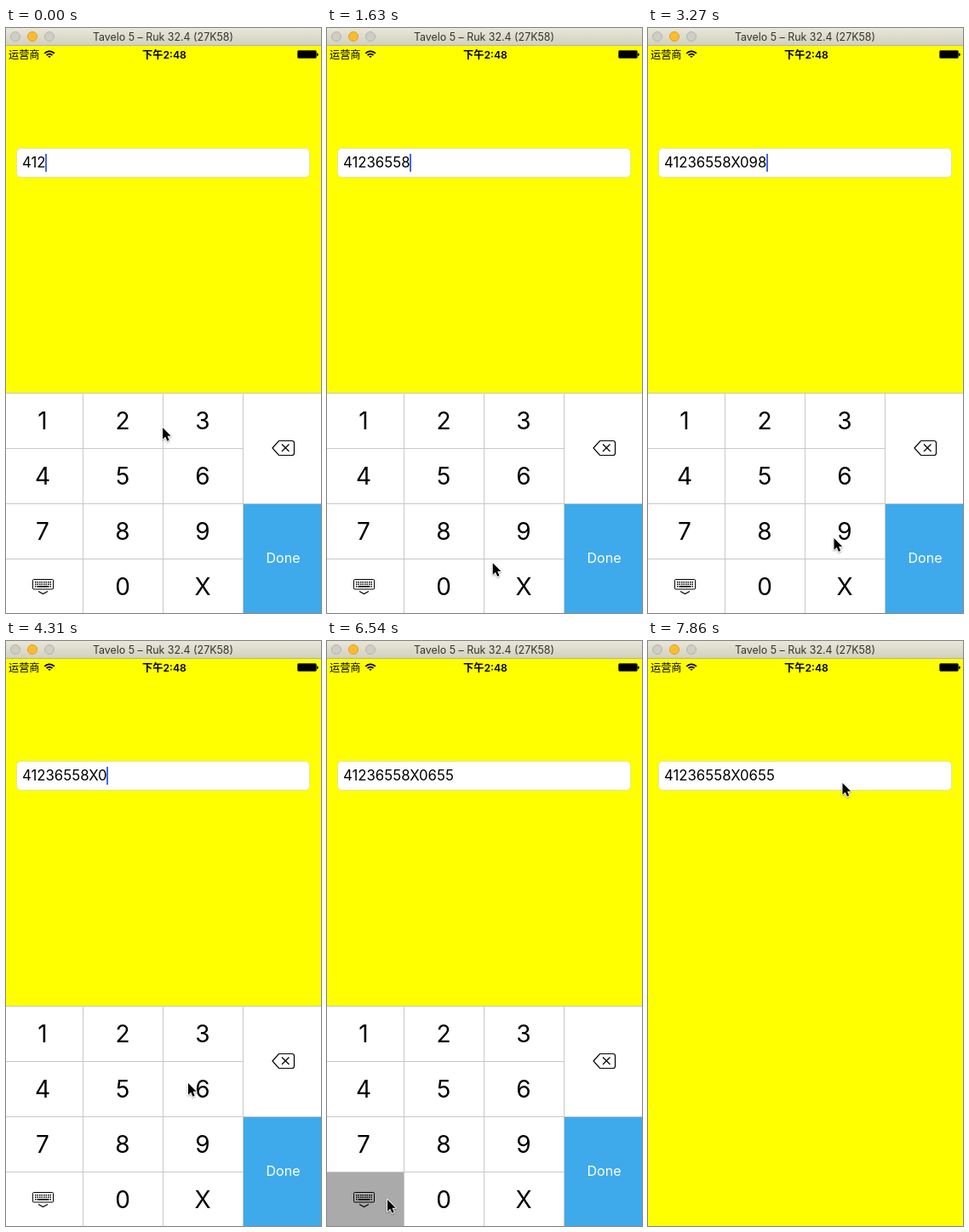
An HTML page with a canvas for the animation above (8000 ms loop, 370 by 688 pixels).

```html
<!DOCTYPE html>
<html lang="zh">
<head>
<meta charset="utf-8">
<title>Number pad</title>
<style>
html, body { margin: 0; width: 100%; height: 100%; overflow: hidden; background: #ff0; }
canvas { display: block; width: 370px; height: 688px; }
</style>
</head>
<body>
<canvas id="stage" width="370" height="688"></canvas>
<script>
const ctx = document.getElementById('stage').getContext('2d');
const W = 370, H = 688, LOOP = 8000, STEP = 148.4;
const LAST = Math.floor(LOOP / STEP);
const PAD_TOP = 430, COL = 94, ROW = 65;
const FONT = 'Inter, "Noto Sans CJK SC", "Noto Sans CJK", sans-serif';
const LINE = '#c8c8c8';

// '<' deletes, 'v' hides the pad
const KEYS = {};
[...'123456789v0X'].forEach((name, i) => addKey(name, i % 3, Math.floor(i / 3), 1));
addKey('<', 3, 0, 2);
addKey('Done', 3, 2, 2);

function addKey(name, col, row, rows) {
  const x = COL * col - 3, y = PAD_TOP + ROW * row;
  const h = ROW * rows - 1;
  KEYS[name] = { x, y, h, cx: x + 46, cy: y + h / 2 };
}

const move = (at, x, y) => ({ at, x, y, hold: 1 });

function tap(at, key, dx = -12, dy = 8, hold = 1) {
  const { cx, cy } = KEYS[key];
  return { at, key, x: cx + dx, y: cy + dy, hold };
}

const EVENTS = [
  move(0, 184, 470),
  tap(3, '3'), tap(6, '6'), tap(7, '5'), tap(8, '5'), tap(10, '8'),
  tap(13, 'X', -13, -18), tap(15, '0'), tap(19, '9'), tap(20, '8'),
  move(23, 218.5, 600),
  tap(26, '<'), tap(27, '<'), tap(30, '6', -17, -7),
  tap(32, '5'), tap(33, '5'), tap(34, '5'),
  tap(38, '<', -12, 1), tap(44, 'v', 28, 0, 3),
  move(52, 228, 151), move(53, 228.5, 167)
];
const HIDE = EVENTS.find(e => e.key === 'v');

const clamp = u => Math.min(1, Math.max(0, u));
const easeOut = u => 1 - (1 - clamp(u)) ** 2;

// The pointer reaches each place one step before it acts there.
function pointerAt(k) {
  const i = EVENTS.findLastIndex(e => e.at <= k);
  const a = EVENTS[i], b = EVENTS[i + 1] || a;
  const leave = a.at + a.hold - 1;
  const u = easeOut((k - leave) / Math.max(1, b.at - 1 - leave));
  return [a.x + (b.x - a.x) * u, a.y + (b.y - a.y) * u];
}

// A key acts when it is released.
function typedAt(k) {
  return EVENTS.filter(e => e.key && e !== HIDE && e.at + e.hold <= k)
    .reduce((s, e) => e.key === '<' ? s.slice(0, -1) : s + e.key, '412');
}

// Quick taps are too short to show a pressed key.
function pressedAt(k) {
  const i = EVENTS.findLastIndex(e => e.at <= k);
  const e = EVENTS[i];
  const slow = i > 0 && e.at - EVENTS[i - 1].at > 2;
  return slow && k < e.at + e.hold ? KEYS[e.key] : null;
}

const slideAt = k => (H - PAD_TOP + 1) * easeOut((k - HIDE.at - HIDE.hold + 0.4) / 2.9);

function rect(x, y, w, h, color) {
  ctx.fillStyle = color;
  ctx.fillRect(x, y, w, h);
}

function text(s, x, y, size, { color = '#000', align = 'left', weight = 400 } = {}) {
  ctx.font = `${weight} ${size}px ${FONT}`;
  ctx.textAlign = align;
  ctx.fillStyle = color;
  ctx.fillText(s, x, y);
}

function stroke(width, color = '#000') {
  ctx.lineWidth = width;
  ctx.strokeStyle = color;
  ctx.stroke();
}

function path(...points) {
  ctx.beginPath();
  points.forEach(p => ctx.lineTo(...p));
}

function roundBox(x, y, w, h, r, fill, edge) {
  ctx.beginPath();
  ctx.roundRect(x, y, w, h, r);
  if (fill) { ctx.fillStyle = fill; ctx.fill(); }
  if (edge) stroke(1, edge);
}

function titleBar() {
  const g = ctx.createLinearGradient(0, 0, 0, 20);
  g.addColorStop(0, '#e9e7d8');
  g.addColorStop(1, '#d2d0bf');
  rect(0, 0, W, 20, g);
  rect(0, 20, W, 1, '#b5b39a');
  for (let i = 0; i < 3; i++) {
    ctx.beginPath();
    ctx.arc(11 + 20 * i, 10, 5.5, 0, 7);
    ctx.fillStyle = i === 1 ? '#fdbc2e' : '#cfcec6';
    ctx.fill();
    stroke(1, i === 1 ? '#dd9f24' : '#b5b4ab');
  }
  text('Tavelo 5 – Ruk 32.4 (27K58)', 184.5, 15, 12.4, { align: 'center', color: '#35342f' });
}

function statusBar() {
  text('运营商', 3, 35.5, 12.2);
  text('下午2:48', 186, 35.5, 12.2, { align: 'center', weight: 600 });
  for (const r of [1.3, 4.4, 7.6]) {
    ctx.beginPath();
    ctx.arc(51, 35, r, -Math.PI * 0.77, -Math.PI * 0.23);
    stroke(1.8);
  }
  roundBox(342.5, 26.5, 22, 9, 1.5, '#000', '#55550a');
  roundBox(365, 29.5, 1.6, 3.6, 0.8, '#000');
}

function field(k) {
  roundBox(12.5, 141.5, 344, 34, 5, '#fff', '#e3e3a0');
  const s = typedAt(k);
  text(s, 19, 164, 16.75);
  if (k < HIDE.at) rect(Math.round(18.5 + ctx.measureText(s).width), 148, 2, 21, '#4468e8');
}

function deleteIcon() {
  path([313, 494], [320.5, 485.5]);
  ctx.arcTo(338.5, 485.5, 338.5, 502.5, 2.5);
  ctx.arcTo(338.5, 502.5, 320.5, 502.5, 2.5);
  ctx.lineTo(320.5, 502.5);
  ctx.closePath();
  stroke(1.2);
  path([324, 489.5], [332.5, 498]);
  stroke(1.2);
  path([332.5, 489.5], [324, 498]);
  stroke(1.2);
}

function hideIcon() {
  roundBox(31.5, 648.5, 24, 11.5, 1, null, '#000');
  for (let i = 0; i < 24; i++)
    rect(34 + (i % 8) * 2.5, 651 + Math.floor(i / 8) * 2.5, 1.5, 1.5, '#000');
  rect(37, 656, 13, 1.5, '#000');
  path([38, 662.5], [43.5, 665.5], [49, 662.5]);
  stroke(1.1);
}

function keypad(k) {
  ctx.save();
  ctx.translate(0, slideAt(k));
  rect(0, PAD_TOP - 1, W, H - PAD_TOP + 1, '#fff');
  const key = pressedAt(k);
  if (key) rect(key.x, key.y, COL, key.h, '#aaa');
  rect(KEYS.Done.x, KEYS.Done.y, COL, KEYS.Done.h, '#3eaaeb');
  for (let i = 0; i < 4; i++) {
    rect(COL * i - 4, PAD_TOP, 1, H - PAD_TOP, LINE);
    rect(0, PAD_TOP - 1 + ROW * i, i % 2 ? COL * 3 - 3 : W, 1, LINE);
  }
  for (const name of '1234567890X')
    text(name, KEYS[name].cx, KEYS[name].cy + 10, 28, { align: 'center' });
  text('Done', 325.5, 629, 16, { align: 'center', color: '#fff' });
  deleteIcon();
  hideIcon();
  ctx.restore();
}

function pointer(k) {
  ctx.save();
  ctx.translate(...pointerAt(k));
  ctx.scale(0.94, 0.94);
  ctx.lineJoin = 'round';
  ctx.shadowColor = 'rgba(0,0,0,.35)';
  ctx.shadowBlur = 2;
  ctx.shadowOffsetY = 1;
  path([0, 0], [0, 14.5], [3.4, 11.4], [5.8, 16.8], [8.2, 15.8], [5.9, 10.5], [10.3, 10.5]);
  ctx.closePath();
  stroke(2, '#fff');
  ctx.shadowColor = 'transparent';
  ctx.fillStyle = '#000';
  ctx.fill();
  ctx.restore();
}

function draw(now) {
  const k = Math.min(LAST, Math.floor((now % LOOP + 8) / STEP));
  rect(0, 0, W, H, '#ff0');
  titleBar();
  statusBar();
  field(k);
  keypad(k);
  pointer(k);
}

let start;
function frame(now) {
  start ??= now;
  draw(Math.max(0, now - start));
  requestAnimationFrame(frame);
}
draw(0);
requestAnimationFrame(frame);
</script>
</body>
</html>
```
